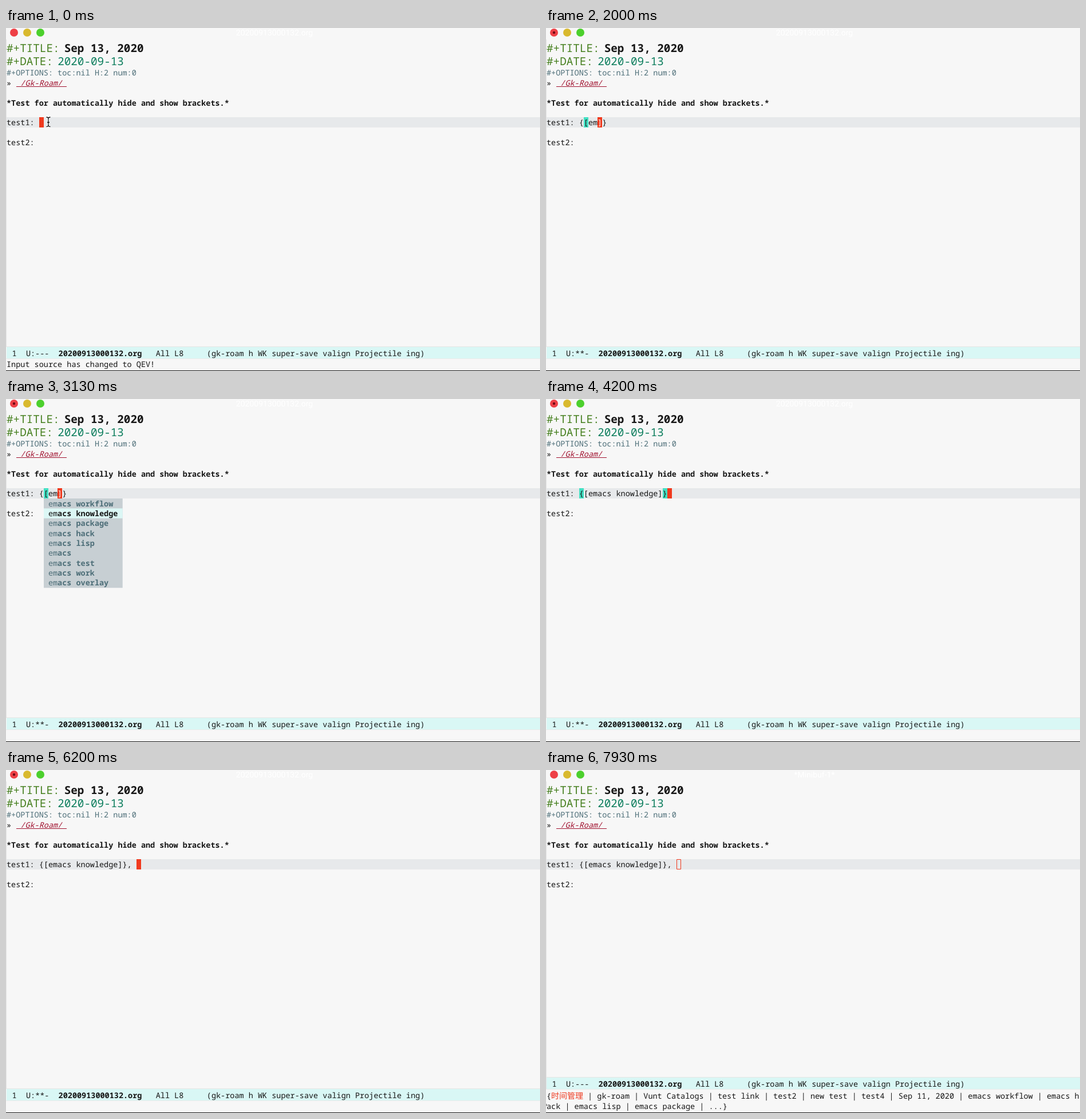
Animation of 933x600 px, one loop 8000 ms. Source, as an HTML page:

```html
<!DOCTYPE html>
<html lang="en">
<head>
<meta charset="utf-8">
<title>Bracket editing demo</title>
<style>
  html, body { margin: 0; width: 100%; height: 100%; overflow: hidden; background: #f7f7f7; }
  svg { display: block; width: 933px; height: 600px; }
  text {
    font: 13.5px "Noto Sans Mono", "Noto Sans CJK SC", "Noto Sans CJK", monospace;
    fill: #161616; white-space: pre; text-rendering: geometricPrecision;
  }
  .b { font-weight: 700; }
  .big { font-size: 19.3px; }
  .key { fill: #478020; }
  .date { fill: #0b7d5c; }
  .opt { fill: #4d6e78; }
  .link { fill: #a0122f; font-style: italic; }
  .inv { fill: #f7f7f7; }
  .hot { fill: #ee3a20; font-size: 14px; }
  .ghost { font: 14px Roboto, sans-serif; fill: #fff; text-anchor: middle; }
</style>
</head>
<body>
<svg id="stage" viewBox="0 0 933 600"></svg>
<script>
const LOOP = 8000, CELL = 8.1, LEFT = 1, ROW = 17.37;
const RED = '#f03a1e', TEAL = '#43e0c3';
const stage = document.getElementById('stage');
const col = n => LEFT + n * CELL;

function add(parent, tag, attrs, content) {
  const el = document.createElementNS('http://www.w3.org/2000/svg', tag);
  for (const k in attrs) el.setAttribute(k, attrs[k]);
  if (content !== undefined) el.textContent = content;
  return parent.appendChild(el);
}
const rect = (p, x, y, width, height, fill) => add(p, 'rect', { x, y, width, height, fill });
const text = (p, x, y, s, cls = '') => add(p, 'text', { x, y, class: cls }, s);
const stroke = (p, d, color, width = 1) =>
  add(p, 'path', { d, fill: 'none', stroke: color, 'stroke-width': width });
const cell = (p, n, y, fill) => rect(p, Math.round(col(n)), y, 8, 18, fill);

// A group that is visible only from one time to another.
function during(from, to) {
  const g = add(stage, 'g', {});
  const frames = [{ offset: 0, opacity: from > 0 ? 0 : 1, easing: 'step-end' }];
  if (from > 0) frames.push({ offset: from / LOOP, opacity: 1, easing: 'step-end' });
  if (to < LOOP) frames.push({ offset: to / LOOP, opacity: 0, easing: 'step-end' });
  frames.push({ offset: 1, opacity: to < LOOP ? 0 : 1 });
  g.animate(frames, { duration: LOOP, iterations: Infinity });
  return g;
}

// Times of the main events
const TYPE = 670, POPUP = 2530, NEXT = 3000, PICK = 4000, SAVE = 6930, PROMPT = 7330;

// Window
rect(stage, 0, 20, 1, 538, '#e4e4e4');
['#ee4046', '#d9b92e', '#4cd02d'].forEach((fill, i) =>
  add(stage, 'circle', { cx: 14 + 23 * i, cy: 8, r: 7, fill }));
add(during(TYPE, SAVE), 'circle', { cx: 14, cy: 8, r: 2.2, fill: '#6d0a14' });
text(during(0, PROMPT), 469, 13, '20200913000132.org', 'ghost');
text(during(PROMPT, LOOP), 469, 13, '*Minibuf-1*', 'ghost');

// Buffer
const bigCell = 19.3 * 0.6;
[['#+TITLE:', 'Sep 13, 2020', 'b', 42], ['#+DATE:', '2020-09-13', 'date', 65]].forEach(([key, val, cls, y]) => {
  text(stage, LEFT, y, key, 'big key');
  text(stage, col(1) + key.length * bigCell, y, val, 'big ' + cls);
});
text(stage, LEFT, 83, '#+OPTIONS: toc:nil H:2 num:0', 'opt');
text(stage, LEFT, 101, '»');
text(stage, col(3), 101, '/Gk-Roam/', 'link');
rect(stage, 18, 102, 88, 1, '#a0122f');
text(stage, LEFT, 135.5, '*Test for automatically hide and show brackets.*', 'b');
rect(stage, 1, 156, 932, 18, '#e7e9eb');
text(stage, LEFT, 205, 'test2:');

// Edited line: start, text, cursor column (-1 hidden), matched columns
const DONE = '{[emacs knowledge]}';
const edits = [
  [0, '', 7],
  [70, '', -1],
  [TYPE, '{}', 8, 7, 8],
  [1130, '{[]}', 9, 7, 10],
  [1270, '{[]}', 9, 8, 9],
  [1670, '{[]}', -1, 8, 9],
  [1930, '{[e]}', 10, 8, 10],
  [2000, '{[em]}', 11, 8, 11],
  [POPUP, '{[em]}', -1, 8, 11],
  [NEXT, '{[em]}', 11, 8, 11],
  [3600, '{[em]}', -1, 8, 11],
  [PICK, DONE, 26, 7, 25],
  [4800, DONE + ',', 27],
  [5400, DONE + ',', -1],
  [5800, DONE + ', ', 28],
  [6400, DONE + ', ', -1],
  [SAVE, DONE + ', ', 28],
  [PROMPT, DONE + ', ', -1]
];
edits.forEach(([from, typed, cursor, ...pair], i) => {
  const g = during(from, i + 1 < edits.length ? edits[i + 1][0] : LOOP);
  const line = 'test1: ' + typed;
  pair.forEach(c => cell(g, c, 156, TEAL));
  if (cursor < 0) return text(g, LEFT, 170, line);
  cell(g, cursor, 156, RED);
  text(g, LEFT, 170, line.slice(0, cursor));
  text(g, col(cursor), 170, line[cursor] || '', 'inv');
  text(g, col(cursor + 1), 170, line.slice(cursor + 1));
});
stroke(during(PROMPT, LOOP), 'M228.5 156.5h7v17h-7z', RED);

// Completion list
const words = ['workflow', 'knowledge', 'package', 'hack', 'lisp', '', 'test', 'work', 'overlay'];
function popup(from, to, chosen) {
  const g = during(from, to), x = 66, top = 174, w = 17 * CELL;
  rect(g, x, top, w, ROW * words.length, '#c7cfd3');
  rect(g, x, top + ROW * chosen, w, ROW, '#dcf7f5');
  words.forEach((word, i) => {
    const y = 187.5 + ROW * i, cls = i === chosen ? '' : 'opt';
    text(g, col(9), y, 'em', cls);
    text(g, col(11), y, 'acs ' + word, 'b ' + cls);
  });
}
popup(POPUP, NEXT, 0);
popup(NEXT, PICK, 1);

// Mouse pointer
const ibeam = 'M70.5 156q3.5 0 3.5 2.5q0-2.5 3.5-2.5M74 158v12M70.5 172.5q3.5 0 3.5-2.5q0 2.5 3.5 2.5M72 165h4';
const mouse = during(0, TYPE);
stroke(mouse, ibeam, '#fff', 3);
stroke(mouse, ibeam, '#111', 1.3);

// Mode line and echo area; the mode line text is inset by its border
function modeLine(from, to, y, flag) {
  const g = during(from, to), inset = 1.5, base = y + 15.5;
  rect(g, 0, y - 1, 933, 1, '#e6e6e4');
  rect(g, 1, y, 932, 20, '#d9f7f5');
  rect(g, 0, y + 20, 933, 1, '#e9ebea');
  text(g, LEFT + inset, base, ' 1  U:' + flag);
  text(g, col(11) + inset, base, '20200913000132.org', 'b');
  text(g, col(32) + inset, base, 'All L8     (gk-roam h WK super-save valign Projectile ing)');
}
modeLine(0, TYPE, 558, '---');
modeLine(TYPE, SAVE, 558, '**-');
modeLine(SAVE, PROMPT, 558, '---');
modeLine(PROMPT, LOOP, 538, '---');

text(during(0, TYPE), LEFT, 593, 'Input source has changed to QEV!');
text(during(SAVE, PROMPT), LEFT, 593, 'Wrote /Users/tolvie/iCloud/blog_site/org/gknows/20200913000132.org');

const prompt = during(PROMPT, LOOP);
text(prompt, LEFT, 574.5, '{');
text(prompt, col(1), 574.5, '时间管理', 'hot');
text(prompt, 65, 574.5, ' | gk-roam | Vunt Catalogs | test link | test2 | new test | test4 | Sep 11, 2020 | emacs workflow | emacs h');
text(prompt, LEFT, 593, 'ack | emacs lisp | emacs package | ...}');
stroke(prompt, 'M0 584q2 1 0 4', '#333');
const promptCursor = during(PROMPT, 7670);
cell(promptCursor, 0, 560, RED);
text(promptCursor, LEFT, 574.5, '{', 'inv');

rect(stage, 0, 599, 933, 1, '#111');
</script>
</body>
</html>
```
